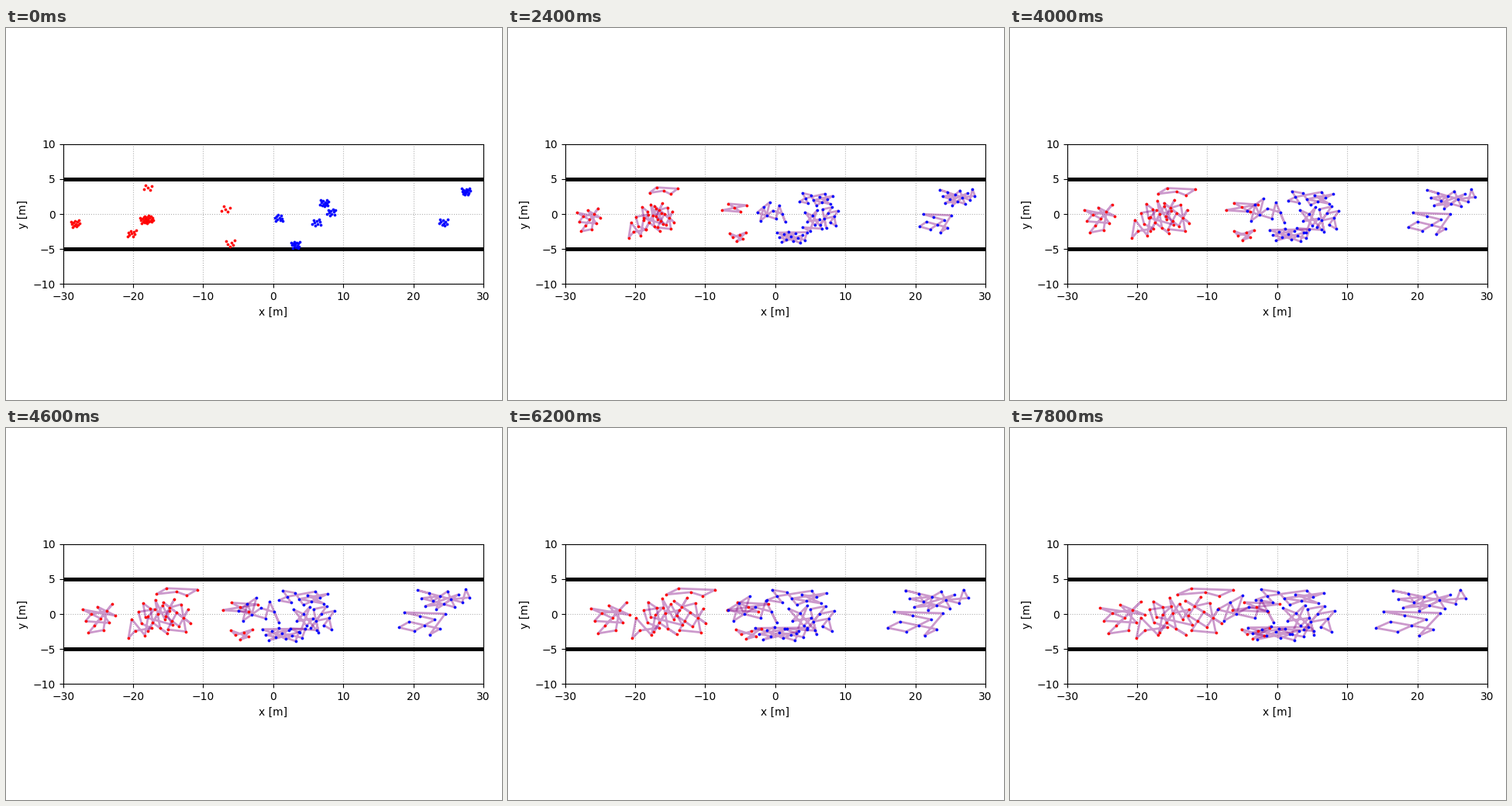
Write a matplotlib script that moves like this. It is 640 px wide and 480 px high and loops after 8000 ms.

```python
import numpy as np
import matplotlib.pyplot as plt
from matplotlib.animation import FuncAnimation

FRAMES, STEP = 40, 200
LAST = 7.8  # seconds at the final frame
GOLDEN = (5 ** 0.5 - 1) / 2
START_SIZE = np.array([0.6, 0.5])

rng = np.random.default_rng(5)
fig = plt.figure(figsize=(6.4, 4.8), dpi=100)
ax = fig.add_axes([73.6 / 640, 149.6 / 480, 542.4 / 640, 180.8 / 480])
ax.set(xlim=(-30, 30), ylim=(-10, 10), xlabel="x [m]", ylabel="y [m]")
ax.set_yticks([-10, -5, 0, 5, 10])
ax.grid(linestyle=":")
for wall in (-5, 5):
    ax.plot([-30, 30], [wall, wall], color="black", lw=3.6)


def scatter_unit(n):
    """n evenly scattered points in [-1, 1] squared, in random order."""
    x = np.linspace(-1, 1, n)
    y = 2 * ((np.arange(n) * GOLDEN + rng.random()) % 1) - 1
    return rng.permutation(np.column_stack([x, y]))


def progress(t):
    """Fractions of the centre shift and of the spread, each as (x, y)."""
    u = t / LAST
    settle = (1 - np.exp(-t / 2.4)) / (1 - np.exp(-LAST / 2.4))
    return np.array([u ** 1.15, settle]), np.array([u ** 0.75, settle])


class Crowd:
    """A closed chain of n walkers that drifts and spreads out."""

    def __init__(self, color, n, start, shift, size):
        self.start, self.shift = np.array(start), np.array(shift)
        self.growth = np.array(size) - START_SIZE
        self.unit = scatter_unit(n)
        self.link, = ax.plot([], [], color="purple", lw=2, alpha=0.4, zorder=2.5)
        self.dots = ax.scatter([], [], s=3, color=color, alpha=0.9, zorder=3)

    def place(self, t):
        move, spread = progress(t)
        size = START_SIZE + self.growth * spread
        pos = self.start + self.shift * move + self.unit * size
        self.dots.set_offsets(pos)
        chain = np.vstack([pos, pos[:1]])
        self.link.set_data(chain[:, 0], chain[:, 1])
        self.link.set_visible(t > 0)


# Colour, walkers, starting centre, total drift and final half-size in metres.
crowds = [
    Crowd("red", 12, (-28.2, -1.4), (6.1, 0.8), (3.2, 2.4)),
    Crowd("red", 9, (-20.2, -2.8), (2.6, 1.5), (2.5, 2.4)),
    Crowd("red", 13, (-18.4, -0.9), (3.5, 0.7), (2.8, 2.9)),
    Crowd("red", 13, (-17.7, -0.7), (7.2, 0.4), (2.6, 2.8)),
    Crowd("red", 5, (-17.9, 3.7), (7.6, -0.7), (4.0, 0.7)),
    Crowd("red", 5, (-6.8, 0.8), (3.8, 0.4), (3.4, 0.9)),
    Crowd("red", 6, (-6.1, -4.2), (3.0, 1.5), (2.0, 0.9)),
    Crowd("blue", 10, (0.8, -0.6), (-5.3, 1.2), (4.0, 2.1)),
    Crowd("blue", 14, (3.2, -4.4), (-3.1, 1.7), (4.3, 1.1)),
    Crowd("blue", 9, (6.2, -1.2), (-3.5, 0.4), (2.5, 2.4)),
    Crowd("blue", 13, (7.3, 1.5), (-5.5, 0.8), (4.9, 1.2)),
    Crowd("blue", 10, (8.3, 0.3), (-2.3, -0.9), (2.2, 2.4)),
    Crowd("blue", 10, (24.3, -1.2), (-5.6, -0.1), (4.6, 1.9)),
    Crowd("blue", 15, (27.5, 3.2), (-5.8, -1.2), (5.2, 1.6)),
]


def update(frame):
    for crowd in crowds:
        crowd.place(frame * STEP / 1000)
    return []


anim = FuncAnimation(fig, update, frames=FRAMES, interval=STEP,
                     init_func=lambda: update(0), repeat=True, repeat_delay=0)
plt.show()
```
